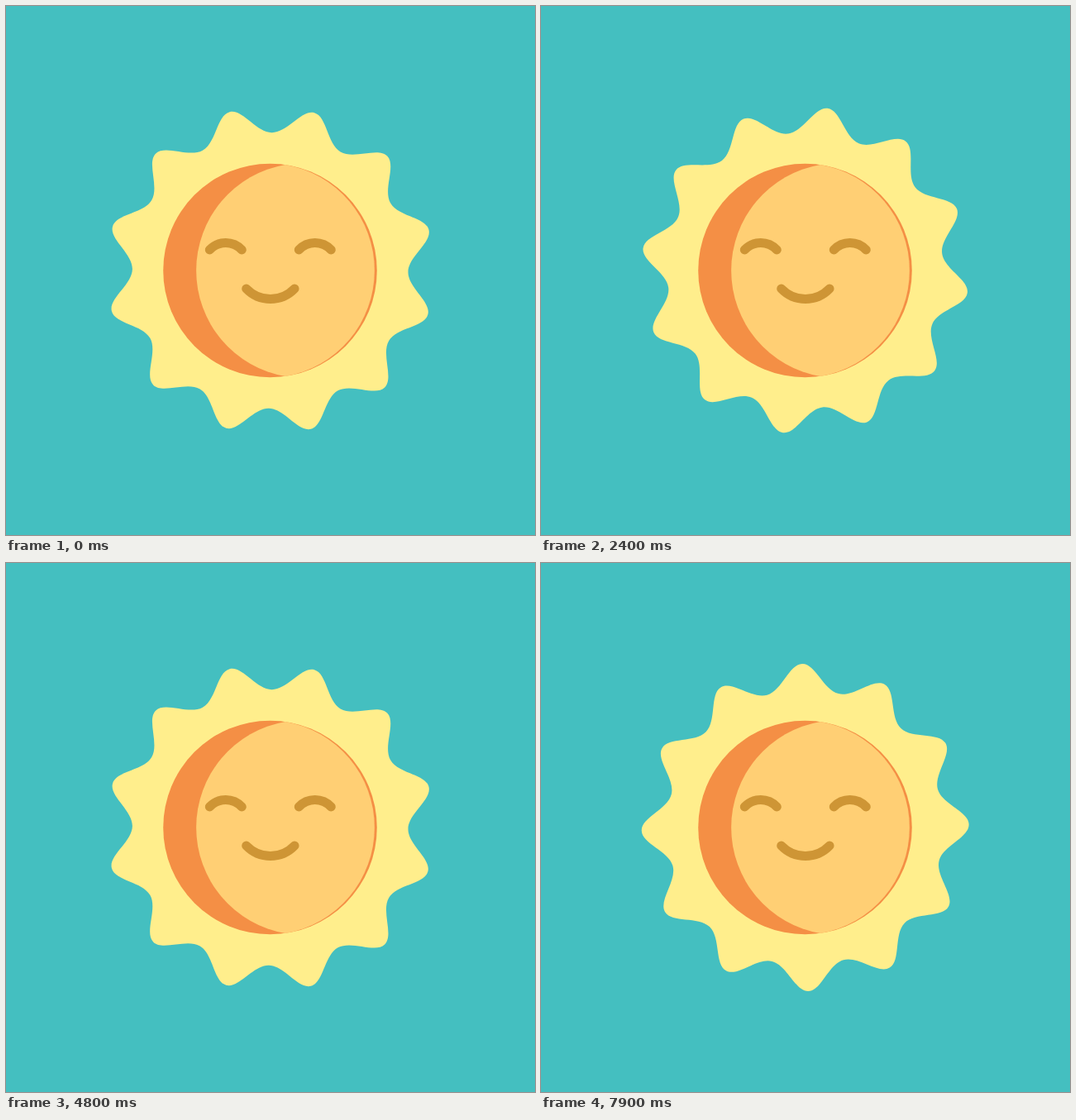
Animation of 640x640 px, one loop 8000 ms. Source, as an HTML page:

```html
<!DOCTYPE html>
<html lang="en">
<head>
<meta charset="utf-8">
<title>Smiling sun</title>
<style>
  html, body { margin: 0; width: 100%; height: 100%; overflow: hidden; background: #44bfc0; }
  svg { display: block; width: 100%; height: 100%; }
</style>
</head>
<body>
<svg viewBox="0 0 640 640">
  <path id="rays" fill="#ffee8c"/>
  <circle cx="319.5" cy="320" r="129.3" fill="#f48f45"/>
  <path d="M338 191.9A130 130 0 0 0 338 448.1A130 130 0 0 0 338 191.9Z" fill="#ffcf74"/>
  <g fill="none" stroke="#ce9535" stroke-width="11" stroke-linecap="round">
    <path d="M246.3 295A26.6 26.6 0 0 1 285.3 295"/>
    <path d="M354.3 295A26.6 26.6 0 0 1 393.3 295"/>
    <path d="M290.7 342A40.4 40.4 0 0 0 349.1 342"/>
  </g>
</svg>
<script>
const POINTS = 12, TIP = 198, DIP = 166.8, TIP_HANDLE = 16, DIP_HANDLE = 19;
const FRAME = 100, LOOP = 8000;
// Swing timing is counted in steps of FRAME, angles in degrees.
const SWING = 48, RISE = 25, START = 3.4, LOW = 11.65, RANGE = 29.25;
const rays = document.getElementById('rays');

// Point at a clockwise angle from the top, shifted along the tangent.
function polar(degrees, radius, along = 0) {
  const a = degrees * Math.PI / 180, s = Math.sin(a), c = Math.cos(a);
  return `${(radius * s + along * c).toFixed(2)} ${(along * s - radius * c).toFixed(2)} `;
}

function raysPath() {
  const step = 360 / POINTS;
  let d = 'M' + polar(0, TIP);
  for (let i = 0; i < POINTS; i++) {
    const a = i * step, dip = a + step / 2, next = a + step;
    d += 'C' + polar(a, TIP, TIP_HANDLE) + polar(dip, DIP, -DIP_HANDLE) + polar(dip, DIP);
    d += 'C' + polar(dip, DIP, DIP_HANDLE) + polar(next, TIP, -TIP_HANDLE) + polar(next, TIP);
  }
  return d + 'Z';
}

rays.setAttribute('d', raysPath());

// The rays turn clockwise, then swing back a little faster.
function draw() {
  const n = (Math.floor(performance.now() % LOOP / FRAME) + START) % SWING;
  const turn = n < RISE ? n / RISE : (SWING - n) / (SWING - RISE);
  rays.setAttribute('transform', `translate(319.7 320) rotate(${LOW + RANGE * turn})`);
  requestAnimationFrame(draw);
}
draw();
</script>
</body>
</html>
```
